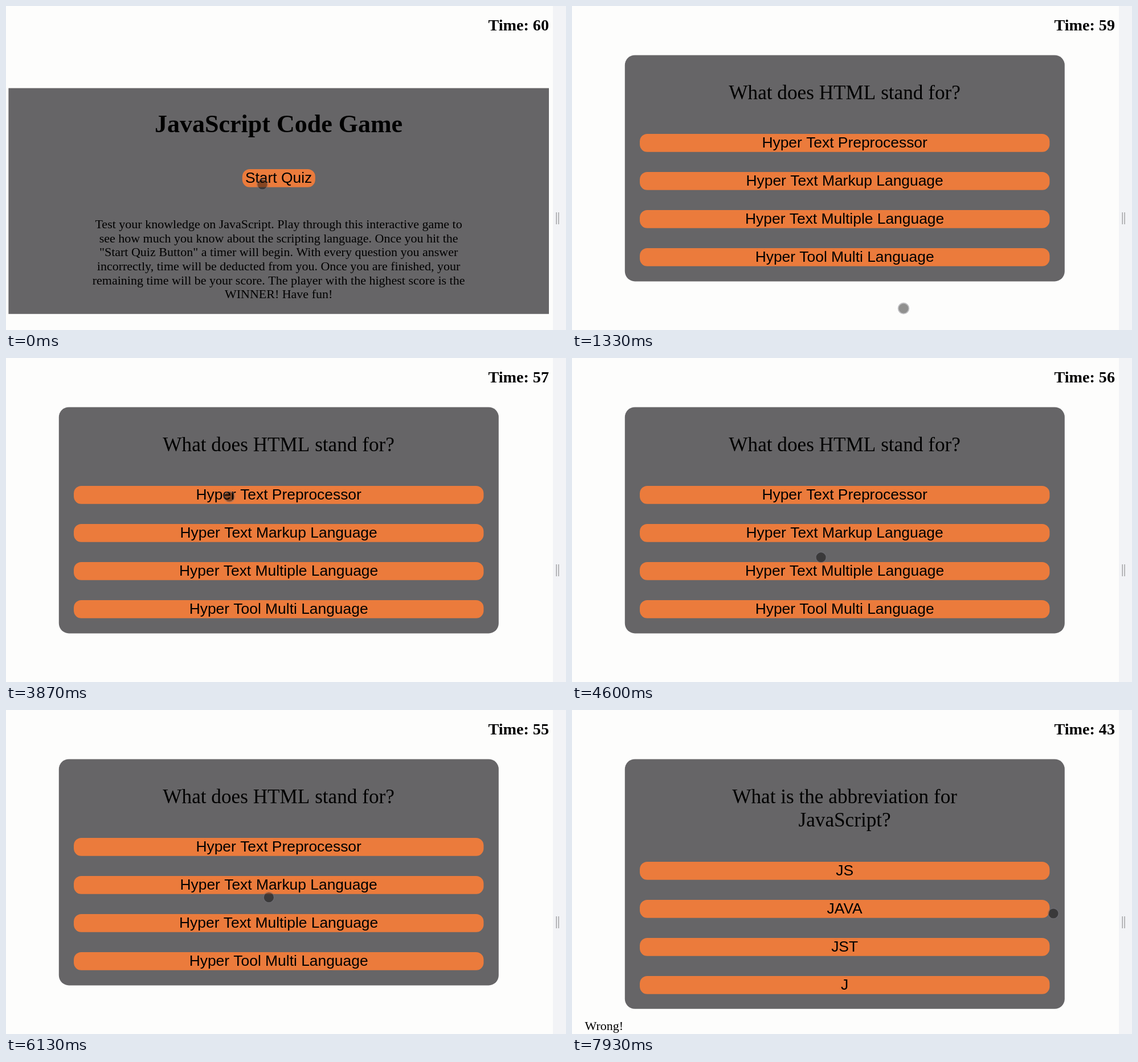
Recreate the animation shown at these times as an HTML page with a canvas. Size 983 by 570 pixels, loop 8 s.

```html
<!DOCTYPE html>
<html lang="en">
<head>
<meta charset="utf-8">
<title>JavaScript Code Game</title>
<style>
html, body { margin: 0; width: 100%; height: 100%; overflow: hidden; background: #fdfdfc; }
canvas { display: block; }
</style>
</head>
<body>
<canvas id="stage" width="983" height="570"></canvas>
<script>
const ctx = document.getElementById('stage').getContext('2d');
const LOOP = 8000, MID = 478.6;
const START = 330, ANSWER = 6465, SECOND = 1014;
const GRAY = '#666567', ORANGE = '#eb7b3c';
const SERIF = '"Liberation Serif", "Times New Roman", serif';
const SANS = '"Liberation Sans", Arial, sans-serif';

const INTRO = [
  'Test your knowledge on JavaScript. Play through this interactive game to',
  'see how much you know about the scripting language. Once you hit the',
  '"Start Quiz Button" a timer will begin. With every question you answer',
  'incorrectly, time will be deducted from you. Once you are finished, your',
  'remaining time will be your score. The player with the highest score is the',
  'WINNER! Have fun!'
];
const HTML_QUESTION = {
  lines: ['What does HTML stand for?'],
  answers: ['Hyper Text Preprocessor', 'Hyper Text Markup Language',
            'Hyper Text Multiple Language', 'Hyper Tool Multi Language']
};
const JS_QUESTION = {
  lines: ['What is the abbreviation for', 'JavaScript?'],
  answers: ['JS', 'JAVA', 'JST', 'J']
};

// Pointer moves: begin, end, x, y; it rests in between.
const MOVES = [
  [0, 1, 450, 314],
  [START, 1130, 582, 532],
  [2070, 2800, 513, 217],
  [2800, 3870, 392, 244],
  [3870, 5330, 482, 457],
  [5330, 6330, 459, 315],
  [7070, 7930, 845, 358]
];

function box(x, y, w, h, r, color) {
  ctx.fillStyle = color;
  ctx.beginPath();
  ctx.roundRect(x, y, w, h, r);
  ctx.fill();
}

function text(str, x, y, font, align = 'center') {
  ctx.fillStyle = '#000';
  ctx.font = font;
  ctx.textAlign = align;
  ctx.fillText(str, x, Math.round(y));
}

function button(label, x, y, w) {
  y = Math.round(y);
  box(x, y, w, 31.8, 13.2, ORANGE);
  text(label, MID, y + 24, '26.4px ' + SANS);
}

function drawIntro() {
  box(4.4, 144.6, 948.6, 397.2, 0, GRAY);
  text('JavaScript Code Game', MID, 222, 'bold 44px ' + SERIF);
  button('Start Quiz', 414.8, 287, 128);
  INTRO.forEach((line, i) => text(line, MID, 391 + i * 24.64, '22px ' + SERIF));
}

function drawQuestion({ lines, answers }) {
  const extra = (lines.length - 1) * 41.4;
  box(92.8, 86.4, 772, 398 + extra, 17.6, GRAY);
  lines.forEach((line, i) => text(line, MID, 163.6 + i * 41.4, '35.2px ' + SERIF));
  answers.forEach((label, i) => button(label, 119, 225.1 + extra + i * 67.1, 719.4));
}

// One second per tick; a wrong answer costs ten more, shown at the next tick.
function secondsLeft(t) {
  const ticks = n => Math.max(0, Math.floor((n - START + 18) / SECOND));
  return 60 - ticks(t) - (ticks(t) > ticks(ANSWER) ? 10 : 0);
}

function drawPointer(t) {
  let [, , x, y] = MOVES[0];
  for (const [begin, end, toX, toY] of MOVES) {
    const u = Math.min(1, Math.max(0, (t - begin) / (end - begin)));
    const k = u * u * (3 - 2 * u);
    x += (toX - x) * k;
    y += (toY - y) * k;
  }
  ctx.beginPath();
  ctx.arc(x, y, 8.6, 0, 7);
  ctx.fillStyle = 'rgba(0,0,0,.43)';
  ctx.fill();
  ctx.beginPath();
  ctx.arc(x, y, 9.4, 0, 7);
  ctx.lineWidth = 1.6;
  ctx.strokeStyle = 'rgba(110,110,120,.45)';
  ctx.stroke();
}

function draw(t) {
  box(0, 0, 983, 570, 0, '#fdfdfc');
  box(960, 0, 23, 570, 0, '#f2f3f6');
  for (const x of [965.5, 969.3]) box(x, 363, 1.5, 21, 0, '#a3a3a6');
  text('Time: ' + secondsLeft(t), 953, 43, 'bold 28.16px ' + SERIF, 'right');

  if (t < START) drawIntro();
  else if (t < ANSWER) drawQuestion(HTML_QUESTION);
  else {
    drawQuestion(JS_QUESTION);
    text('Wrong!', 22.5, 563, '22px ' + SERIF, 'left');
  }
  drawPointer(t);
}

const began = performance.now();
function tick() {
  draw((performance.now() - began) % LOOP);
  requestAnimationFrame(tick);
}
tick();
</script>
</body>
</html>
```
